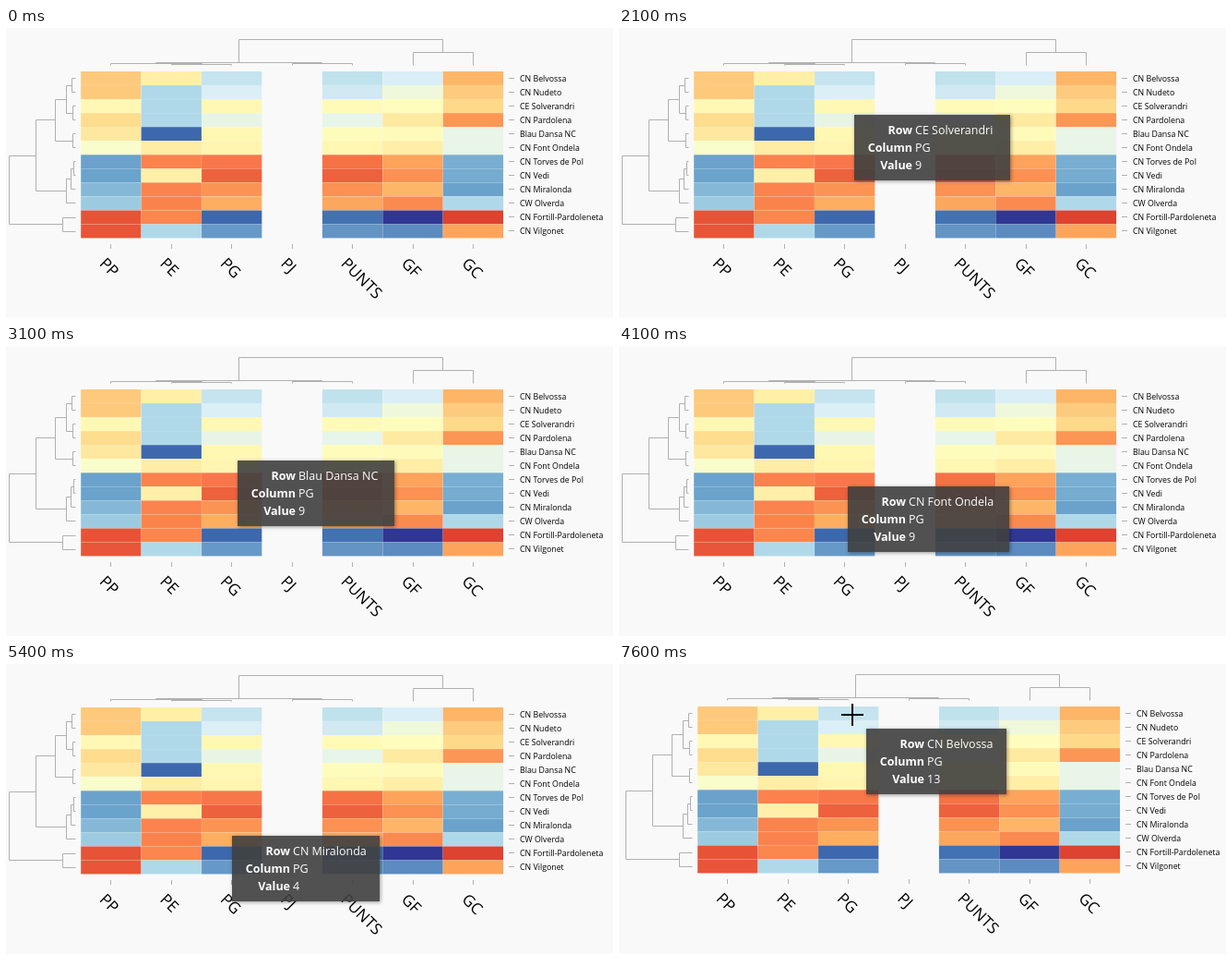
An HTML page that plays this animation: 658x314 px, repeating every 8000 ms.

```html
<!DOCTYPE html>
<html lang="ca">
<head>
<meta charset="utf-8">
<title>Clustered heatmap</title>
<style>
  html, body { margin: 0; width: 100%; height: 100%; overflow: hidden; background: #f9f9f9; }
  body { position: relative; font-family: "Open Sans", "Noto Sans", sans-serif; }
  svg { position: absolute; left: 0; top: 0; display: block; }
  .lines { fill: none; stroke: #b0b0b0; stroke-width: 1; }
  .rowName { font-size: 8.8px; fill: #000; }
  .colName { font-size: 17px; fill: #000; }
  #tip {
    position: absolute; left: 0; top: 0; height: 71px; box-sizing: border-box; padding-top: 8.2px;
    background: rgba(64, 64, 64, .9); box-shadow: 1px 1px 4px rgba(0, 0, 0, .4);
    color: #fff; font-size: 12.5px; line-height: 18.8px; white-space: nowrap;
  }
  #tip div { display: flex; }
  #tip b { width: 63px; margin-right: 3px; text-align: right; flex: none; }
</style>
</head>
<body>
<svg width="658" height="314" viewBox="0 0 658 314">
  <g id="chart"></g>
  <path id="cursor" d="M-12 0H12M0 -12V12" stroke="#000" stroke-width="2" fill="none"/>
</svg>
<div id="tip">
  <div><b>Row</b><span id="tipRow"></span></div>
  <div><b>Column</b><span>PG</span></div>
  <div><b>Value</b><span id="tipValue"></span></div>
</div>
<script>
const LEFT = 81.2, TOP = 47, COL_W = 458 / 7, ROW_H = 15.05, GAP = .15;
const LOOP = 8000, STEP = 100, SHIFT_AT = 7100;

const columns = ["PP", "PE", "PG", "PJ", "PUNTS", "GF", "GC"];

// name, PG value, tooltip width, cell colours ("-" is an empty cell)
const rows = [
  ["CN Belvossa", 13, 152, "fdc97d fef0a7 c5e4ef - c0e2ed d9eef6 fdb567"],
  ["CN Nudeto", 12, 147, "fdca7c afd9e9 daeff6 - d0e9f2 eff8db fdcb7d"],
  ["CE Solverandri", 9, 169, "fff8b4 afd9e9 fff8b4 - fffab8 fffdbd fed98a"],
  ["CN Pardolena", 11, 160, "fedd8f afd9e9 e8f5e6 - e8f5ea feeaa0 fc9655"],
  ["Blau Dansa NC", 9, 170, "fee89f 3d68ae fff8b3 - fefcbb fefbba e8f5e7"],
  ["CN Font Ondela", 9, 175, "f9fdcc feeda5 fff5b0 - fff7b2 feeea6 e8f5e7"],
  ["CN Torves de Pol", 3, 184, "6ba2cb fb824d f8774a - f57245 fda35b 78aed2"],
  ["CN Vedi", 2, 128, "6aa3cc fff0a9 ed613c - ee613d fb9152 75acd0"],
  ["CN Miralonda", 4, 160, "85b8d7 fa834e fb9453 - fb9152 fdb668 6aa2cb"],
  ["CW Olverda", 5, 152, "9ccbe1 fa834c fdae61 - fca75e f98a50 afd9e9"],
  ["CN Fortill-Pardoleneta", 18, 218, "e75336 fb864e 3e68ae - 4272b2 303694 de4230"],
  ["CN Vilgonet", 16, 154, "e85538 afd9e9 6699c7 - 6394c4 5b8bc0 fda45c"]
];

// A branch is [depth, first, second]; a number is a leaf.
const rowTree = [3,
  [32,
    [53, [65, [71, 0, 1], [72, 2, 3]], [72, 4, 5]],
    [65, [70, [73, 6, 7], 8], 9]],
  [61, 10, 11]];
const colTree = [12,
  [37, [38, 0, [39, 1, 2]], [38, 3, 4]],
  [26, 5, 6]];

// Tooltip corner over time: [ms, x, y]
const sweep = [[1200, 270, 65], [1400, 262, 73], [1500, 262, 73], [2100, 255, 94], [2400, 254, 102],
  [3100, 251, 124], [3300, 250, 131], [4100, 248, 152], [4200, 248, 155], [5100, 245, 182], [5400, 245, 186]];
const comeback = [[7300, 271, 63], [7600, 268, 70]];

const byId = id => document.getElementById(id);
const chart = byId("chart"), cursor = byId("cursor"), tip = byId("tip");
const tipRow = byId("tipRow"), tipValue = byId("tipValue");

const colX = i => LEFT + COL_W * (i + .5);
const rowY = i => TOP + ROW_H * (i + .5);
const snap = v => Math.floor(v) + .5;

function add(tag, attrs, text) {
  const el = document.createElementNS("http://www.w3.org/2000/svg", tag);
  for (const key in attrs) el.setAttribute(key, attrs[key]);
  if (text) el.textContent = text;
  chart.appendChild(el);
}

// Returns the path of a tree; place() turns (depth, position) into a point.
function treePath(root, leafPos, leafDepth, place) {
  let d = "";
  const point = (depth, pos) => place(snap(depth), snap(pos)).join(" ");
  function visit(node) {
    if (typeof node === "number") return { depth: leafDepth, pos: leafPos(node) };
    const a = visit(node[1]), b = visit(node[2]);
    d += "M" + point(a.depth, a.pos) + "L" + point(node[0], a.pos) +
         "L" + point(node[0], b.pos) + "L" + point(b.depth, b.pos);
    return { depth: node[0], pos: (a.pos + b.pos) / 2 };
  }
  visit(root);
  return d;
}

function drawChart() {
  rows.forEach(([name, , , colours], r) => {
    colours.split(" ").forEach((colour, c) => {
      if (colour === "-") return;
      add("rect", { x: LEFT + COL_W * c, y: TOP + ROW_H * r, width: COL_W - GAP, height: ROW_H - GAP, fill: "#" + colour });
    });
    add("path", { class: "lines", d: `M545 ${snap(rowY(r) - .3)}h6` });
    add("text", { class: "rowName", x: 557, y: rowY(r) + 3 }, name);
  });
  columns.forEach((name, c) => {
    const x = colX(c);
    add("path", { class: "lines", d: `M${snap(x)} 234v5` });
    add("text", { class: "colName", transform: `translate(${x - 13.3} 256) rotate(45)` }, name);
  });
  add("path", { class: "lines", d: treePath(rowTree, rowY, 75, (depth, pos) => [depth, pos]) });
  add("path", { class: "lines", d: treePath(colTree, colX, 40, (depth, pos) => [pos, depth]) });
}

function along(keys, t) {
  const next = keys.findIndex(k => k[0] > t);
  if (next < 0) return keys[keys.length - 1].slice(1);
  const a = keys[next - 1], b = keys[next], f = (t - a[0]) / (b[0] - a[0]);
  return [1, 2].map(i => a[i] + (b[i] - a[i]) * f);
}

function render(time) {
  const t = Math.floor((time % LOOP) / STEP) * STEP;
  const shifted = t >= SHIFT_AT;
  const keys = shifted ? comeback : sweep;
  const hover = t >= keys[0][0];

  chart.setAttribute("transform", shifted ? "translate(4 -1)" : "translate(0 0)");
  tip.style.display = hover ? "block" : "none";
  cursor.style.display = hover && shifted ? "inline" : "none";
  if (!hover) return;

  const [x, y] = along(keys, t).map(Math.round);
  const [name, value, width] = rows[Math.floor((y - 15 - TOP) / ROW_H)] || rows[0];
  tip.style.transform = `translate(${x}px, ${y}px)`;
  tip.style.width = width + "px";
  tipRow.textContent = name;
  tipValue.textContent = value;
  cursor.setAttribute("transform", `translate(${x - 15} ${y - 15})`);
}

drawChart();
const start = performance.now();
function loop() {
  render(performance.now() - start);
  requestAnimationFrame(loop);
}
loop();
</script>
</body>
</html>
```
